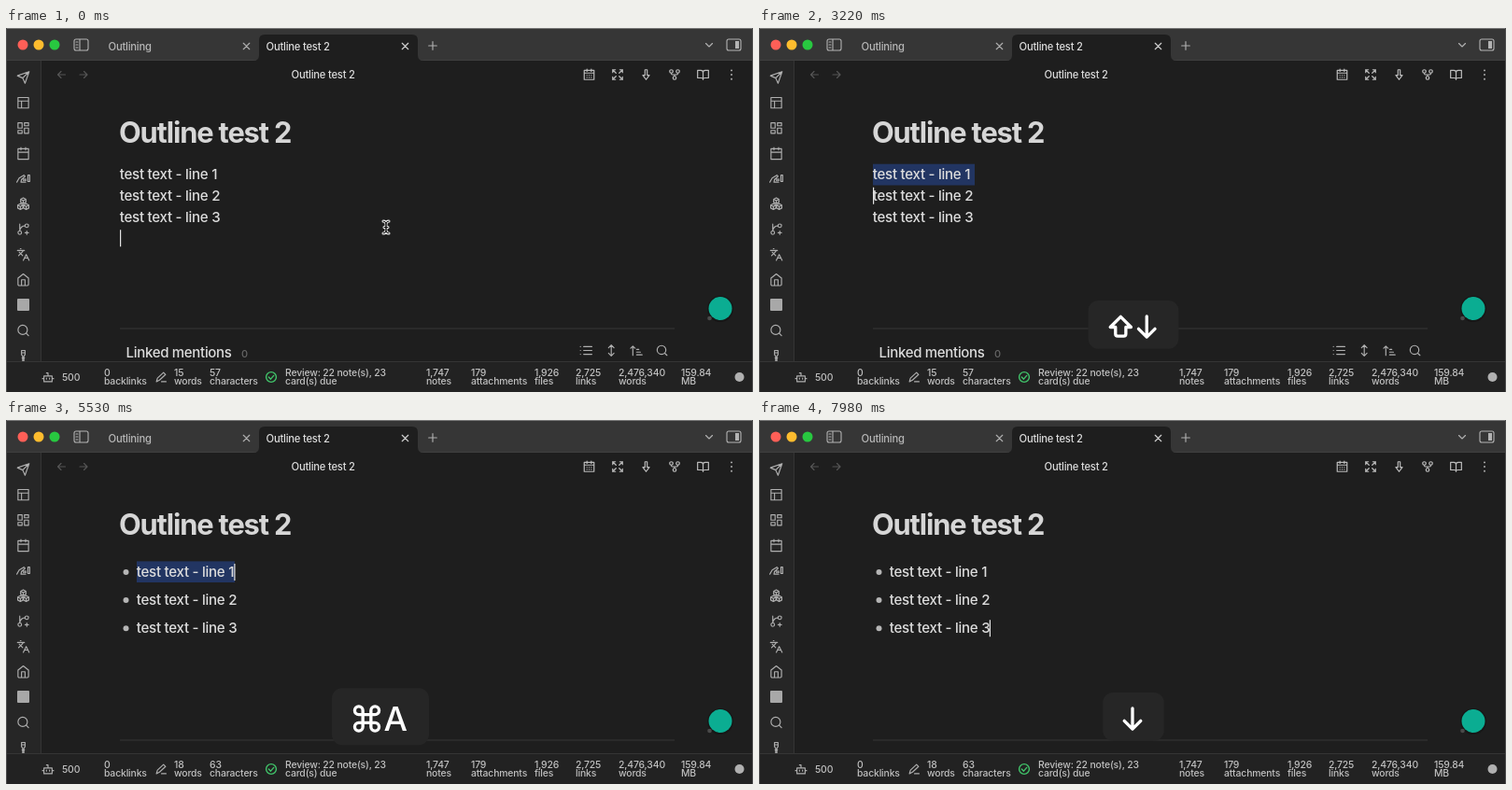
An HTML page for the animation above (8000 ms loop, 800 by 390 pixels).

```html
<!DOCTYPE html>
<html lang="en">
<head>
<meta charset="utf-8">
<title>Outline test</title>
<style>
  html, body { margin: 0; width: 100%; height: 100%; overflow: hidden; background: #1e1e1e; }
  svg { display: block; width: 100vw; height: 100vh; }
  text { font-family: Inter, "Open Sans", sans-serif; fill: #dcdcdc; white-space: pre; }
  .body { font-size: 15.1px; font-weight: 500; letter-spacing: -.28px; }
  .title { font-size: 30.8px; font-weight: 700; letter-spacing: -1.15px; fill: #d6d6d6; }
  .tab { font-size: 11.2px; font-weight: 500; letter-spacing: -.2px; }
  .status { font-size: 10.4px; font-weight: 500; letter-spacing: -.15px; fill: #c0c0c0; }
  .mentions { font-size: 15px; font-weight: 500; letter-spacing: -.3px; }
  .key { font-size: 36px; font-weight: 500; fill: #fff; }
  .icon { fill: none; stroke-linecap: round; stroke-linejoin: round; }
</style>
</head>
<body>
<svg viewBox="0 0 800 390"><g id="chrome"></g><g id="editor"></g><g id="status"></g><g id="popup"></g></svg>
<script>
const LOOP = 8000;
const layer = id => document.getElementById(id);
const rect = (x, y, w, h, fill, r = 0) =>
  `<rect x="${x}" y="${y}" width="${w}" height="${h}" rx="${r}" fill="${fill}"/>`;
const dot = (x, y, r, fill) => `<circle cx="${x}" cy="${y}" r="${r}" fill="${fill}"/>`;
const text = (cls, x, y, s, style = '') => `<text class="${cls}" x="${x}" y="${y}" style="${style}">${s}</text>`;
const line = (d, color = '#b3b3b3', width = 1.1) =>
  `<path class="icon" d="${d}" stroke="${color}" stroke-width="${width}"/>`;

// Icons are drawn on a 24-unit grid and centred on (x, y).
const ring = (x, y, r) => `M${x - r} ${y}a${r} ${r} 0 1 0 ${2 * r} 0a${r} ${r} 0 1 0 ${-2 * r} 0`;
const cube = (x, y) => `M${x} ${y - 5}l4.5 2.5v5l-4.5 2.5-4.5-2.5v-5zM${x - 4.5} ${y - 2.5}l4.5 2.5 4.5-2.5M${x} ${y}v5`;
const icons = {
  send: 'M22 2 11 13M22 2l-7 20-4-9-9-4z',
  layout: 'M3 3h18v18H3zM3 9h18M9 21V9',
  dashboard: 'M3 3h7v9H3zM14 3h7v5h-7zM14 12h7v9h-7zM3 16h7v5H3z',
  calendar: 'M3 4h18v18H3zM16 2v4M8 2v4M3 10h18',
  month: 'M3 4h18v17H3zM16 2v4M8 2v4M3 9h18M8 13h.1M12 13h.1M16 13h.1M8 17h.1M12 17h.1M16 17h.1',
  hand: 'M1 18l4-7 8-5 2 2-5 5h7M9 13l-1 5h8M12 15h5M20 6h3v11h-3z',
  boxes: cube(12, 6.5) + cube(7, 16.5) + cube(17, 16.5),
  branch: 'M6 3v12M15 6a9 9 0 0 0-9 9M18 15v6M21 18h-6' + ring(18, 6, 3) + ring(6, 18, 3),
  languages: 'M5 8l6 6M4 14l6-6 2-3M2 5h12M7 2h1M22 22l-5-10-5 10M14 18h6',
  home: 'M3 9l9-7 9 7v11a2 2 0 0 1-2 2H5a2 2 0 0 1-2-2zM9 22V12h6v10',
  search: 'M21 21l-4.3-4.3' + ring(11, 11, 8),
  tool: 'M9 3h6v7l-2 3v9h-2v-9l-2-3zM9 7h6M10 16h4',
  expand: 'M21 21l-6-6M21 16v5h-5M3 16v5h5M3 21l6-6M21 8V3h-5M21 3l-6 6M3 8V3h5M3 3l6 6',
  bigDown: 'M10 3h4v10h4l-6 8-6-8h4z',
  fork: 'M18 9v1a2 2 0 0 1-2 2H8a2 2 0 0 1-2-2V9M12 12v3' + ring(12, 18, 3) + ring(6, 6, 3) + ring(18, 6, 3),
  book: 'M2 4h6a4 4 0 0 1 4 4v13a3 3 0 0 0-3-3H2zM22 4h-6a4 4 0 0 0-4 4v13a3 3 0 0 1 3-3h7z',
  more: 'M12 4v.1M12 12v.1M12 20v.1',
  left: 'M20 12H4M11 5l-7 7 7 7',
  right: 'M4 12h16M13 5l7 7-7 7',
  close: 'M6 6l12 12M18 6 6 18',
  plus: 'M12 4v16M4 12h16',
  chevron: 'M5 9l7 7 7-7',
  list: 'M8 5h15M8 12h15M8 19h15M2 5h.1M2 12h.1M2 19h.1',
  updown: 'M12 2v20M7 7l5-5 5 5M7 17l5 5 5-5',
  sort: 'M5 21V4M1 8l4-4 4 4M12 10h4M12 15h7M12 20h10',
  robot: 'M4 10h16v11H4zM12 10V4h-3M1 15h3M20 15h3M9 14v2M15 14v2',
  pencil: 'M3 21l2-7L17 3l4 4L9 18zM13 21h9',
  check: 'M7 12l4 4 6-7' + ring(12, 12, 10)
};
const icon = (name, x, y, size = 15, color = '#b0b0b0', weight = 1.15) => {
  const k = size / 24;
  return `<path class="icon" transform="translate(${x - size / 2} ${y - size / 2}) scale(${k})" ` +
    `d="${icons[name]}" stroke="${color}" stroke-width="${weight / k}"/>`;
};

function drawChrome() {
  const ribbon = ['send', 'layout', 'dashboard', 'calendar', 'hand', 'boxes', 'branch', 'languages', 'home', '', 'search', 'tool'];
  const tools = ['month', 'expand', 'bigDown', 'fork', 'book', 'more'];
  return rect(0, 0, 800, 390, '#1e1e1e') +
    rect(0, 0, 800, 35, '#363636') + rect(0, 0, 800, 1, '#777') +
    rect(0, 34, 800, 1, '#3f3f3f') +
    rect(0, 35, 37, 323, '#262626') + rect(37, 35, 1, 323, '#343434') +
    rect(799, 0, 1, 390, '#4c4c4c') + rect(0, 0, 1, 390, '#4c4c4c') +
    '<path d="M265 35q6 0 6-6V13q0-6 6-6h158q6 0 6 6v16q0 6 6 6z" fill="#1e1e1e"/>' +
    ['#fe5f57', '#febc2e', '#28c840'].map((c, i) => dot(18 + 17 * i, 18, 5.5, c)).join('') +
    line('M75 12h11a2 2 0 0 1 2 2v8a2 2 0 0 1-2 2H75a2 2 0 0 1-2-2v-8a2 2 0 0 1 2-2zM79 12v12M75 15h2M75 18h2M75 21h2') +
    line('M774 12h11a2 2 0 0 1 2 2v8a2 2 0 0 1-2 2h-11a2 2 0 0 1-2-2v-8a2 2 0 0 1 2-2z') + rect(781, 14, 4, 8, '#b3b3b3') +
    text('tab', 109.5, 23.5, 'Outlining', 'fill:#b8b8b8') + text('tab', 278.5, 23.5, 'Outline test 2') +
    text('tab', 305.5, 54, 'Outline test 2') +
    icon('close', 257.5, 19.5, 13) + icon('close', 427.5, 19.5, 13, '#d0d0d0') +
    icon('plus', 457, 19, 13) + icon('chevron', 753, 18, 12) +
    icon('left', 59.5, 50, 12, '#555') + icon('right', 83, 50, 12, '#555') +
    ribbon.map((n, i) => n ? icon(n, 18.5, 53 + 27.1 * i, 15) : rect(12, 290, 13, 13, '#a8a8a8', 1)).join('') +
    tools.map((n, i) => icon(n, 624.5 + 30.5 * i, 50, 14, '#bcbcbc', n === 'more' ? 1.8 : 1.2)).join('') +
    text('title', 121, 123.3, 'Outline test 2');
}

function drawStatus(isList) {
  const items = [
    [105, '0', 'backlinks'], [180, isList ? 18 : 15, 'words'], [218, isList ? 63 : 57, 'characters'],
    [299, 'Review: 22 note(s), 23', 'card(s) due'], [450, '1,747', 'notes'], [498, '179', 'attachments'],
    [566, '1,926', 'files'], [610, '2,725', 'links'], [656, '2,476,340', 'words'], [723, '159.84', 'MB']
  ];
  return rect(1, 357, 798, 33, '#222') + rect(1, 357, 798, 1, '#353535') +
    icon('robot', 45, 374, 13) + text('status', 60, 377.5, '500') +
    icon('pencil', 166, 374, 13) + icon('check', 284, 374, 13, '#41c46a', 1.4) +
    items.map(([x, a, b]) => text('status', x, 372.5, a) + text('status', x, 382, b)).join('') +
    dot(785.5, 374, 5, '#b0b0b0');
}

const rowY = (isList, row) => isList ? 162.7 + 30.1 * row : 157 + 22.75 * row;
const rowEnd = [245, 247.5, 247.5];

function drawEditor(s, caretOn) {
  const selColor = '#223562', widths = [109, 110, 106];
  let out = '';
  for (let i = 0; i < 3; i++) {
    const y = rowY(s.list, i), x = s.list ? 140 : 122;
    const marked = s.list && s.sel === 3 && i > 0;
    if (i < s.sel) {
      const w = s.list && s.sel === 1 ? 105 : widths[i] + (s.list && i === 2 ? 1 : 0);
      out += rect(x, y - 11.3, w, s.list ? 22.6 : 22.8, selColor);
      if (marked) out += rect(125, y - 11.3, 11, 22.6, selColor);
    }
    if (s.list) out += marked ? rect(127, y, 5, 1.3, '#74798a') : dot(128.5, y + .3, 3, '#b5b5b5');
    out += text('body', x - .2, y + 5.3, `test text - line ${i + 1}`);
  }
  if (caretOn) {
    const y = s.list && s.row === 3 ? 246.5 : rowY(s.list, s.row) + (s.list ? .3 : 0);
    const x = !s.list || s.row === 3 ? 122 : s.atEnd ? rowEnd[s.row] - .7 : 139.5;
    out += rect(x, y - 9, 1.2, 18, '#e4e4e4');
  }
  out += rect(122, s.list ? 342.5 : 321.5, 594, 1, '#363636');
  if (!s.list) {
    out += text('mentions', 128.5, 353, 'Linked mentions') + text('status', 252, 352.5, '0', 'font-size:11px;fill:#666') +
      ['list', 'updown', 'sort', 'search'].map((n, i) => icon(n, 621 + 27.2 * i, 345.5, 14)).join('');
  }
  const badgeY = s.list ? 322.5 : 300.5;
  out += dot(765, badgeY + .5, 14, '#171717') + dot(765, badgeY, 12.5, '#0bad92') + dot(753.5, badgeY + 10.5, 2.3, '#4a4a4a');
  if (s.mouse) {
    const beam = 'M404 207q3 0 3 3v7q0 3-3 3M410 207q-3 0-3 3v7q0 3 3 3M405 213.5h4';
    out += line(beam, '#eee', 3) + line(beam, '#111', 1);
  }
  return out;
}

// Key symbols, each with the width of its box.
const stroke = d => line(d, '#fff', 3.6);
const command = x => `<path class="icon" transform="translate(${x - 17.4} 302.6) scale(1.45)" stroke="#fff" stroke-width="2.3"
  d="M15 6v12a3 3 0 1 0 3-3H6a3 3 0 1 0 3 3V6a3 3 0 1 0-3 3h12a3 3 0 1 0-3-3"/>`;
const down = x => stroke(`M${x} 308v23M${x - 9.5} 322.5l9.5 9.5 9.5-9.5`);
const keys = {
  selectAll: [104, command(386.5) + text('key', 404.5, 333, 'A')],
  bullet: [120, command(380.5) + stroke('M434 309.5v6q0 6-6 6h-24M412 313l-8.5 8.5 8.5 8.5')],
  extend: [114, stroke('M386.3 308.5l-12 12h6v8q0 2.5 2.5 2.5h7q2.5 0 2.5-2.5v-8h6z') + down(416.5)],
  down: [77, down(400)],
  up: [77, stroke('M400 332v-23M390.5 317.5l9.5-9.5 9.5 9.5')]
};

// Each press: time, key, and the editor state that follows.
const presses = [
  [0, null, { list: false, sel: 0, row: 3, mouse: true }],
  [900, 'selectAll', { sel: 3 }],
  [2050, 'up', { sel: 0, row: 2, mouse: false }],
  [2300, 'up', { row: 1 }],
  [2550, 'up', { row: 0 }],
  [3150, 'extend', { sel: 1, row: 1 }],
  [3450, 'extend', { sel: 2, row: 2 }],
  [3750, 'extend', { sel: 3, row: 3 }],
  [4200, 'bullet', { list: true }],
  [4750, 'up', { sel: 0, row: 2 }],
  [4900, 'up', { row: 1 }],
  [5050, 'up', { row: 0 }],
  [5350, 'selectAll', { sel: 1, atEnd: true }],
  [6500, 'down', { sel: 0, row: 1 }],
  [7920, 'down', { row: 2 }]
];

function drawPopup(key, age, shownFor) {
  if (!key || age > 1200) return '';
  const [width, glyphs] = keys[key];
  const grow = .85 + .15 * Math.min(1, Math.max(0, (shownFor - 80) / 100));
  const w = width * grow, h = 61 * grow, k = (1 + grow) / 2;
  const opacity = Math.min(1, (1200 - age) / 150);
  return `<g opacity="${opacity}">${rect(401 - w / 2, 317.8 - h / 2, w, h, '#262626', 11)}` +
    `<g transform="translate(400 320) scale(${k}) translate(-400 -320)">${glyphs}</g></g>`;
}

layer('chrome').innerHTML = drawChrome();

function frame(now) {
  const t = now % LOOP;
  const state = {};
  let last = 0, key = null, since = 0;
  for (const [at, name, change] of presses) {
    if (at > t) break;
    if (name !== key || at - last > 1200) since = at;
    Object.assign(state, change);
    last = at;
    key = name;
  }
  const age = t - last;
  layer('editor').innerHTML = drawEditor(state, age % 1200 < 600);
  layer('status').innerHTML = drawStatus(state.list);
  layer('popup').innerHTML = drawPopup(key, age, t - since);
  requestAnimationFrame(frame);
}
requestAnimationFrame(frame);
</script>
</body>
</html>
```
